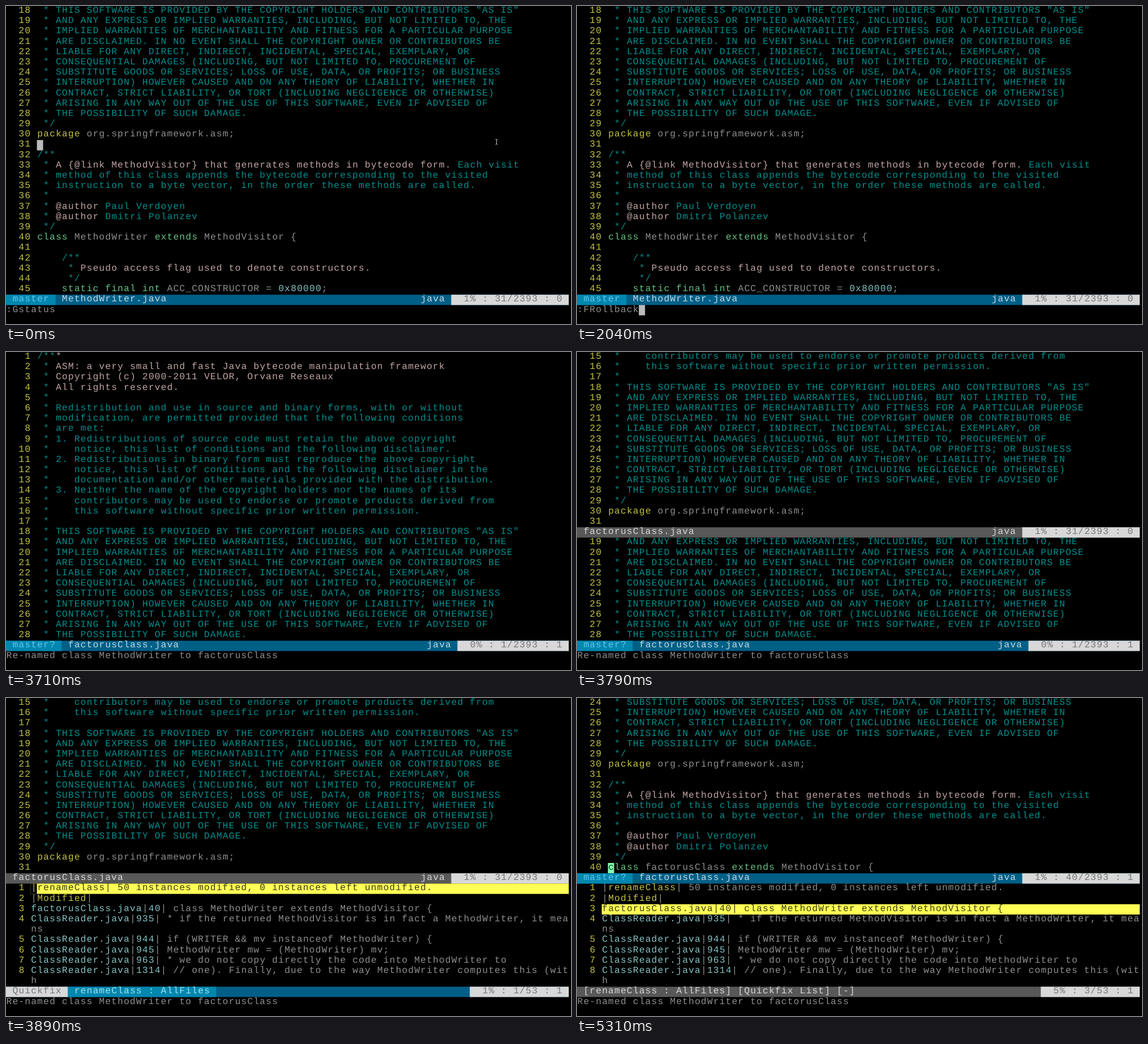
Write an HTML page that moves like this. It is 998x561 px and loops after 9.92 s.

```html
<!DOCTYPE html>
<html lang="en">
<head>
<meta charset="utf-8">
<title>Renaming a class in Vim</title>
<style>
  html, body { margin: 0; width: 100%; height: 100%; overflow: hidden; background: #000; }
  #term { position: relative; width: 998px; height: 561px; overflow: hidden; background: #000; }
  svg { position: absolute; left: 0; top: 0; visibility: hidden; }
  svg.on { visibility: visible; }
  text {
    font: 16.4px "Liberation Mono", monospace; letter-spacing: 1.08px; white-space: pre;
    text-rendering: geometricPrecision; font-variant-ligatures: none; fill-opacity: .76;
  }
</style>
</head>
<body>
<div id="term"></div>
<script>
const W = 10.923, H = 18.19, COLS = 91, LOOP = 9920;
const fg = { t: '#00bbbb', p: '#ffd7d7', y: '#ffff55', g: '#87ffaf', w: '#bbbbbb', c: '#afffff', k: '#000000' };
const NAVY = '#005f87', BLUE = '#0087af', SKY = '#87d7ff', LIGHT = '#d8d8d8', DIM = '#585858', GREY = '#585858';

// "~x" switches to colour x of the palette above
const source = `/**~p*
 * ~pASM: a very small and fast Java bytecode manipulation framework
 * ~pCopyright (c) 2000-2011 VELOR, Orvane Reseaux
 * ~pAll rights reserved.
 *
 * Redistribution and use in source and binary forms, with or without
 * modification, are permitted provided that the following conditions
 * are met:
 * 1. Redistributions of source code must retain the above copyright
 *    notice, this list of conditions and the following disclaimer.
 * 2. Redistributions in binary form must reproduce the above copyright
 *    notice, this list of conditions and the following disclaimer in the
 *    documentation and/or other materials provided with the distribution.
 * 3. Neither the name of the copyright holders nor the names of its
 *    contributors may be used to endorse or promote products derived from
 *    this software without specific prior written permission.
 *
 * THIS SOFTWARE IS PROVIDED BY THE COPYRIGHT HOLDERS AND CONTRIBUTORS "AS IS"
 * AND ANY EXPRESS OR IMPLIED WARRANTIES, INCLUDING, BUT NOT LIMITED TO, THE
 * IMPLIED WARRANTIES OF MERCHANTABILITY AND FITNESS FOR A PARTICULAR PURPOSE
 * ARE DISCLAIMED. IN NO EVENT SHALL THE COPYRIGHT OWNER OR CONTRIBUTORS BE
 * LIABLE FOR ANY DIRECT, INDIRECT, INCIDENTAL, SPECIAL, EXEMPLARY, OR
 * CONSEQUENTIAL DAMAGES (INCLUDING, BUT NOT LIMITED TO, PROCUREMENT OF
 * SUBSTITUTE GOODS OR SERVICES; LOSS OF USE, DATA, OR PROFITS; OR BUSINESS
 * INTERRUPTION) HOWEVER CAUSED AND ON ANY THEORY OF LIABILITY, WHETHER IN
 * CONTRACT, STRICT LIABILITY, OR TORT (INCLUDING NEGLIGENCE OR OTHERWISE)
 * ARISING IN ANY WAY OUT OF THE USE OF THIS SOFTWARE, EVEN IF ADVISED OF
 * THE POSSIBILITY OF SUCH DAMAGE.
 */
~ypackage ~worg.springframework.asm;

/**
 * ~pA {@link MethodVisitor} that generates methods in bytecode form. ~tEach visit
 * method of this class appends the bytecode corresponding to the visited
 * instruction to a byte vector, in the order these methods are called.
 *
 * ~p@author ~tPaul Verdoyen
 * ~p@author ~tDmitri Polanzev
 */
~gclass ~wMethodWriter ~gextends ~wMethodVisitor {

    /**
     * ~pPseudo access flag used to denote constructors.
     */
    ~gstatic final int ~wACC_CONSTRUCTOR = ~c0x80000~w;`.split('\n');

const reader = (line, code) => `~cClassReader.java~w|~c${line}~w| ${code}`;
const quickfix = [
  [18, '1', '|~yrenameClass~w| 50 instances modified, 0 instances left unmodified.'],
  [19, '2', '|~yModified~w|'],
  [20, '3', '~cfactorusClass.java~w|~c40~w| class MethodWriter extends MethodVisitor {'],
  [21, '4', reader(935, '* if the returned MethodVisitor is in fact a MethodWriter, it mea')],
  [22, '', 'ns'],
  [23, '5', reader(944, 'if (WRITER && mv instanceof MethodWriter) {')],
  [24, '6', reader(945, 'MethodWriter mw = (MethodWriter) mv;')],
  [25, '7', reader(963, '* we do not copy directly the code into MethodWriter to')],
  [26, '8', reader(1314, '// one). Finally, due to the way MethodWriter computes this (wit')],
  [27, '', 'h']
];

const term = document.getElementById('term');
let screen;

function add(parent, tag, attrs) {
  const el = document.createElementNS('http://www.w3.org/2000/svg', tag);
  for (const key in attrs) el.setAttribute(key, attrs[key]);
  return parent.appendChild(el);
}

function put(row, col, text, color, bg, cols = text.length) {
  const x = col * W, y = row * H;
  if (bg) add(screen, 'rect', { x, y, width: cols * W, height: H, fill: bg });
  if (text.trim()) add(screen, 'text', { x: x + .54, y: y + 12, fill: color }).textContent = text;
}

function rich(row, col, markup, first = 'w') {
  for (const run of `${first}${markup}`.split('~')) {
    const text = run.slice(1);
    put(row, col, text, fg[run[0]]);
    col += text.length;
  }
}

function code(row, from, to, lines = source) {
  for (let n = from; n <= to; n++, row++) {
    put(row, 0, String(n).padStart(4), fg.y);
    rich(row, 5, lines[n - 1], 't');
  }
}

function status(row, bg, segments, type, info) {
  put(row, 0, '', bg, bg, COLS);
  let col = 0;
  for (const [text, color, back] of segments) {
    put(row, col, ` ${text} `, color, back);
    col += text.length + 2;
  }
  const right = `  ${info} `, start = COLS - right.length;
  put(row, start - type.length - 1, type, '#ffffff');
  put(row, start, right, DIM, LIGHT);
}

const fileStatus = (row, branch, file, info) =>
  status(row, NAVY, [[branch, SKY, BLUE], [file, '#ffffff']], 'java', info);
const idleStatus = (row, name, type, info) =>
  status(row, GREY, [[name, '#ffffff']], type, info);
const command = text => put(29, 0, text, fg.w);
const block = (row, col, ch = ' ', bg = fg.w, color = fg.k) => put(row, col, ch, color, bg);

function errors(current, list = quickfix) {
  for (const [row, n, text] of list) {
    put(row, 2, n, fg.y);
    if (row === current) put(row, 4, text.replace(/~./g, ''), fg.k, fg.y, COLS - 4);
    else rich(row, 4, text);
  }
}

function editing(text, cursor) {
  code(0, 18, 45);
  fileStatus(28, 'master', 'MethodWriter.java', '1% : 31/2393 : 0');
  command(text);
  if (cursor) block(29, text.length);
}

function start() {
  editing(':Gstatus');
  block(13, 5);
  add(screen, 'path', {
    d: 'M864.5 235.5h1.5l.5 .5 .5-.5h1.5M866.5 236v7.5M864.5 244h1.5l.5-.5 .5 .5h1.5',
    fill: 'none', stroke: '#ccc'
  });
}

function renamed(from = 1) {
  code(from - 1, from, 28);
  fileStatus(28, 'master?', 'factorusClass.java', '0% : 1/2393 : 1');
  command('Re-named class MethodWriter to factorusClass');
}

function upper() {
  code(0, 15, 31);
  idleStatus(17, 'factorusClass.java', 'java', '1% : 31/2393 : 0');
}

function browse(line, percent, ch, bg, color) {
  upper();
  errors(18);
  block(17 + line, 4, ch, bg, color);
  status(28, NAVY, [['Quickfix', DIM, LIGHT], ['renameClass : AllFiles', '#d7ffff', BLUE]], '',
    `${percent}% : ${line}/53 : 1`);
  command('Re-named class MethodWriter to factorusClass');
}

function jumped() {
  code(0, 24, 39);
  code(16, 40, 40, source.map(s => s.replace('~wMethodWriter', '~wfactorusClass')));
  block(16, 5, 'c', fg.g);
  fileStatus(17, 'master?', 'factorusClass.java', '1% : 40/2393 : 1');
  errors(20);
  idleStatus(28, '[renameClass : AllFiles] [Quickfix List] [-]', '', '5% : 3/53 : 1');
  command('Re-named class MethodWriter to factorusClass');
}

const rename = ':FRenameClass factorusClass';
const timeline = [
  [0, start],
  [1400, () => editing(':', true)],
  [1780, () => editing(':F', true)],
  [2040, () => editing(':FRollback', true)],
  [2420, () => editing(rename, true)],
  [3170, () => editing(rename)],
  [3710, () => renamed()],
  [3790, () => { upper(); renamed(19); }],
  [3840, () => { upper(); errors(18, quickfix.slice(0, 1)); renamed(20); }],
  [3890, () => browse(1, 1, '|', fg.k, fg.y)],
  [4720, () => browse(2, 3, '|')],
  [4910, () => browse(3, 5, 'f', fg.c)],
  [5310, jumped]
].map(([at, draw]) => {
  screen = add(term, 'svg', { width: 998, height: 561 });
  draw();
  return { at, el: screen };
});

let shown;
function tick() {
  const t = performance.now() % LOOP;
  const next = timeline.findLast(s => s.at <= t).el;
  if (next !== shown) {
    if (shown) shown.classList.remove('on');
    next.classList.add('on');
    shown = next;
  }
  requestAnimationFrame(tick);
}
tick();
</script>
</body>
</html>
```
